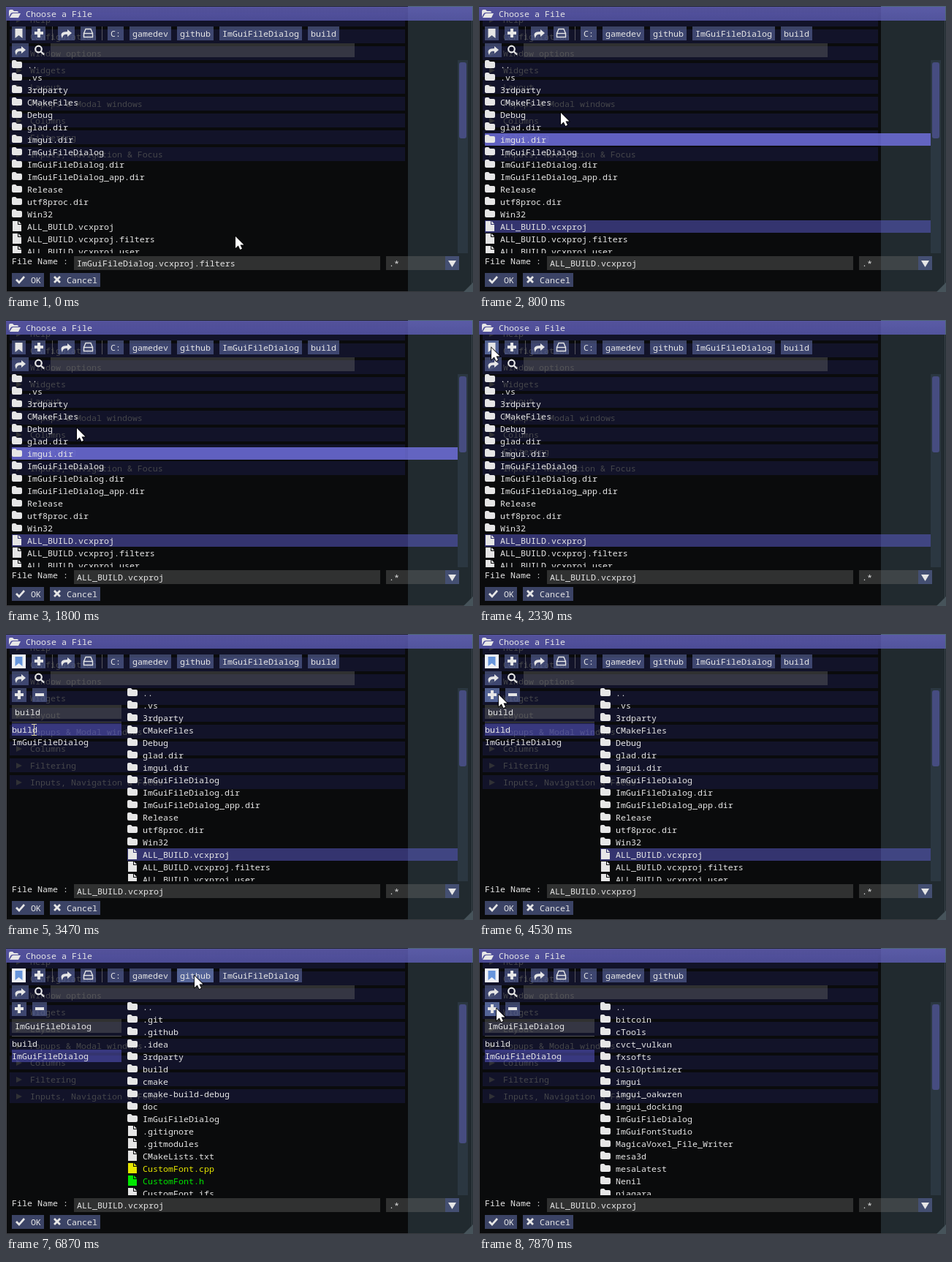
Animation, 639 px wide and 391 px high, one loop 8000 ms. Source, as an HTML page with a canvas:

```html
<!DOCTYPE html>
<html lang="en">
<head>
<meta charset="utf-8">
<title>File dialog</title>
<style>
  html, body { margin: 0; width: 100%; height: 100%; overflow: hidden; background: #0a0b0c; }
  canvas { display: block; }
</style>
</head>
<body>
<canvas id="stage" width="639" height="391"></canvas>
<script>
const ctx = document.getElementById('stage').getContext('2d');
const LOOP = 8000, STEP = 1000 / 15, ROW = 17;
const FONT = '11.667px "Noto Sans Mono", "Liberation Mono", monospace';
const C = {
  text: '#e6e6e6',
  button: 'rgba(89,102,156,.62)', buttonHover: 'rgba(102,122,181,.79)', buttonOn: '#eef0f6',
  field: 'rgba(110,110,110,.39)', line: 'rgba(128,128,128,.6)',
  row: 'rgba(102,102,230,.45)', rowHover: 'rgba(115,115,230,.8)',
  track: 'rgba(51,64,77,.6)', grab: 'rgba(102,102,204,.45)'
};

const icons = {
  folder: 'M0 2Q0 0 2 0H5L7 2H12Q14 2 14 4V9Q14 11 12 11H2Q0 11 0 9Z',
  file: 'M0 0H7V5H12V14H0ZM8 0L12 4H8Z',
  bookmark: 'M0 0H10V13L5 9L0 13Z',
  plus: 'M4 0H8V4H12V8H8V12H4V8H0V4H4Z',
  minus: 'M0 0H12V4H0Z',
  share: 'M9 0L15 5L9 10V7Q3 6 2 12Q-3 3 9 3Z',
  check: 'M0 6L2 4L5 7L11 0L13 2L5 11Z',
  cross: 'M2 0L5 3L8 0L10 2L7 5L10 8L8 10L5 7L2 10L0 8L3 5L0 2Z',
  open: 'M0 10V2Q0 0 2 0H5L7 2H11Q13 2 13 4H5Q3 4 2 6ZM1 11L4 6Q5 5 6 5H16L13 11Z',
  arrow: 'M0 0V16L3.8 12.6L6.4 18L9 16.8L6.5 11.4H11.5Z'
};
for (const name in icons) icons[name] = new Path2D(icons[name]);

const headers = ['Help', 'Configuration', 'Window options', 'Widgets', 'Layout',
  'Popups & Modal windows', 'Columns', 'Filtering', 'Inputs, Navigation & Focus'];

const folders = {
  build: {
    dirs: 13, grab: 104,
    names: ['..', '.vs', '3rdparty', 'CMakeFiles', 'Debug', 'glad.dir', 'imgui.dir', 'ImGuiFileDialog',
      'ImGuiFileDialog.dir', 'ImGuiFileDialog_app.dir', 'Release', 'utf8proc.dir', 'Win32',
      'ALL_BUILD.vcxproj', 'ALL_BUILD.vcxproj.filters', 'ALL_BUILD.vcxproj.user',
      'cmake_install.cmake', 'CMakeCache.txt', 'ImGuiFileDialog.sln', 'ImGuiFileDialog.vcxproj']
  },
  project: {
    dirs: 10, grab: 190,
    names: ['..', '.git', '.github', '.idea', '3rdparty', 'build', 'cmake', 'cmake-build-debug', 'doc',
      'ImGuiFileDialog', '.gitignore', '.gitmodules', 'CMakeLists.txt', 'CustomFont.cpp',
      'CustomFont.h', 'CustomFont.ifs']
  },
  github: {
    dirs: 16, grab: 117,
    names: ['..', 'bitcoin', 'cTools', 'cvct_vulkan', 'fxsofts', 'GlslOptimizer', 'imgui', 'imgui_oakwren',
      'imgui_docking', 'ImGuiFileDialog', 'ImGuiFontStudio', 'MagicaVoxel_File_Writer', 'mesa3d',
      'mesaLatest', 'Nenil', 'niagara']
  }
};
const crumbs = ['C:', 'gamedev', 'github', 'ImGuiFileDialog', 'build'];
const bookmarks = ['build', 'ImGuiFileDialog'];
const bookmarkPaths = ['C:\\gamedev\\github\\ImGuiFileDialog\\build', 'C:\\gamedev\\github\\ImGuiFileDialog'];

// Tracks: [time, values...]
const pointer = [[0, 314, 315], [60, 314, 315], [130, 357, 306], [300, 357, 306], [530, 170, 303],
  [600, 160, 297], [800, 112, 146], [1130, 104, 130], [1260, 104, 130], [1530, 97, 148], [1860, 97, 148],
  [2330, 17, 38], [3300, 17, 38], [3400, 38, 108], [3460, 38, 124], [3530, 37, 141], [4060, 37, 141],
  [4400, 27, 83], [4600, 27, 83], [4870, 41, 128], [5000, 46, 144], [5320, 46, 144], [5460, 45, 154],
  [6140, 45, 154], [6670, 258, 38], [6920, 258, 38], [7530, 15, 80], [7790, 15, 80], [7870, 24, 83]];
const scrolling = [[0, 0], [1260, 0], [1400, 51], [1530, 0], [1930, 0], [2060, 51], [2200, 0]];
const bookmarkHover = [[0, -1], [3520, 0], [3590, 1], [4120, -1], [4920, 0], [5390, 1], [6190, -1]];

function tween(track, t) {
  const i = track.findIndex(k => k[0] > t);
  if (i < 0) return track[track.length - 1].slice(1);
  const a = track[i - 1], b = track[i], p = (t - a[0]) / (b[0] - a[0]);
  return a.slice(1).map((v, n) => Math.round(v + (b[n + 1] - v) * p));
}
const held = (track, t) => track.filter(k => k[0] <= t).pop()[1];

function box(x, y, w, h, color) {
  ctx.fillStyle = color;
  ctx.fillRect(x, y, w, h);
}
function label(s, x, y, color = C.text) {
  ctx.fillStyle = color;
  ctx.fillText(s, x, y + 4);
}
function icon(name, x, y, color = C.text) {
  ctx.save();
  ctx.translate(x, y);
  ctx.fillStyle = color;
  ctx.fill(icons[name]);
  ctx.restore();
}
function triangle(x1, y1, x2, y2, x3, y3, color) {
  ctx.fillStyle = color;
  ctx.beginPath();
  ctx.moveTo(x1, y1); ctx.lineTo(x2, y2); ctx.lineTo(x3, y3);
  ctx.fill();
}
function button(x, y, w, mouse, on) {
  const over = mouse[0] >= x && mouse[0] < x + w && mouse[1] >= y && mouse[1] < y + 20;
  box(x, y, w, 19, on ? C.buttonOn : over ? C.buttonHover : C.button);
}
function row(x, y, w, hovered, selected) {
  if (hovered || selected) box(x, y - 9, w, ROW, hovered ? C.rowHover : C.row);
}

function drawWindow() {
  box(0, 0, 639, 391, '#0a0b0c');
  box(550, 0, 89, 391, '#212a2f');
  headers.forEach((s, i) => {
    const y = 19 + 23 * i;
    box(5, y - 10, 541, 19, '#121329');
    triangle(14, y - 4, 22, y, 14, y + 4, '#303135');
    label(s, 33, y, '#45464a');
  });
  box(0, 0, 550, 2, '#22262b');
  box(550, 0, 89, 20, '#4d6674');
  const title = ctx.createLinearGradient(0, 1, 0, 20);
  title.addColorStop(0, 'rgba(92,90,172,.9)');
  title.addColorStop(1, 'rgba(82,82,161,.9)');
  box(0, 1, 638, 19, title);
  icon('open', 4, 5);
  label('Choose a File', 27, 11);
  box(0, 20, 1, 371, '#45464c');
  box(0, 390, 630, 1, '#3a3b40');
  box(637, 20, 1, 362, '#39434a');
  triangle(639, 378, 639, 391, 626, 391, '#46535a');
}

function drawToolbar(mouse, depth, paneOpen) {
  button(8, 28, 19, mouse, paneOpen);
  icon('bookmark', 12.5, 31, paneOpen ? '#6795dc' : C.text);
  button(35, 28, 19, mouse);
  icon('plus', 39, 31);
  button(71, 28, 23, mouse);
  icon('share', 75, 32);
  button(102, 28, 21, mouse);
  ctx.strokeStyle = C.text;
  ctx.lineWidth = 1.4;
  ctx.strokeRect(106.5, 37.5, 12, 5);
  ctx.beginPath();
  ctx.moveTo(106.5, 37.5); ctx.lineTo(109, 31.5); ctx.lineTo(116, 31.5); ctx.lineTo(118.5, 37.5);
  ctx.stroke();
  for (const x of [63, 131]) box(x, 28, 1, 19, C.line);

  let x = 139;
  for (const s of crumbs.slice(0, depth)) {
    const w = s.length * 7 + 8;
    button(x, 28, w, mouse);
    label(s, x + 4, 38);
    x += w + 8;
  }

  button(8, 51, 23, mouse);
  icon('share', 12, 55);
  ctx.strokeStyle = C.text;
  ctx.lineWidth = 2.2;
  ctx.beginPath();
  ctx.arc(44.5, 59, 4.3, 0, 7);
  ctx.moveTo(47.7, 62.2); ctx.lineTo(52, 66.5);
  ctx.stroke();
  box(61, 51, 416, 19, C.field);
}

function drawBookmarks(mouse, selected, hover) {
  button(8, 74, 20, mouse);
  icon('plus', 12, 77);
  let top = 97;
  if (selected >= 0) {
    button(36, 74, 20, mouse);
    icon('minus', 40, 81);
    box(8, 97, 150, 19, C.field);
    label(bookmarks[selected], 12, 107);
    top = 120;
  }
  box(8, top, 150, 1, C.line);
  bookmarks.forEach((s, i) => {
    const y = top + 11 + ROW * i;
    row(8, y, 150, i === hover, i === selected);
    label(s, 8, y);
  });
}

function drawFiles(folder, left, scroll, selected, hover) {
  ctx.save();
  ctx.beginPath();
  ctx.rect(left, 74, 625, 264);
  ctx.clip();
  folder.names.forEach((s, i) => {
    const y = 81 + ROW * i - scroll;
    row(left, y, 618 - left, i === hover, i === selected);
    const color = s.endsWith('.cpp') ? '#e6e600' : s.endsWith('.h') ? '#00e600' : C.text;
    if (i < folder.dirs) icon('folder', left, y - 7, color);
    else icon('file', left + 1, y - 8, color);
    label(s, left + 21, y, color);
  });
  ctx.restore();
  box(618, 74, 14, 264, C.track);
  ctx.fillStyle = C.grab;
  ctx.beginPath();
  ctx.roundRect(620, 77 + scroll * 0.4, 10, folder.grab, 3);
  ctx.fill();
}

function drawFooter(name, mouse) {
  label('File Name :', 8, 349);
  box(93, 342, 419, 19, C.field);
  label(name, 97, 352);
  box(520, 342, 81, 19, C.field);
  label('.*', 524, 352);
  box(601, 342, 19, 19, C.button);
  triangle(605, 348, 616, 348, 610.5, 357, C.text);
  button(8, 365, 44, mouse);
  icon('check', 13, 369);
  label('OK', 34, 375);
  button(60, 365, 69, mouse);
  icon('cross', 65, 369);
  label('Cancel', 83, 375);
}

function drawTooltip(s, x, y) {
  ctx.beginPath();
  ctx.roundRect(x + 0.5, y + 0.5, s.length * 7 + 15, 27, 7);
  ctx.fillStyle = '#131416';
  ctx.fill();
  ctx.strokeStyle = '#54555c';
  ctx.lineWidth = 1;
  ctx.stroke();
  label(s, x + 8, y + 14);
}

function drawPointer(x, y, beam) {
  if (beam) {
    ctx.strokeStyle = '#d8d0a0';
    ctx.lineWidth = 1;
    ctx.beginPath();
    for (const dy of [-7.5, 7.5]) { ctx.moveTo(x - 3, y + dy); ctx.lineTo(x + 4, y + dy); }
    ctx.moveTo(x + 0.5, y - 7); ctx.lineTo(x + 0.5, y + 7);
    ctx.stroke();
    return;
  }
  ctx.save();
  ctx.translate(x, y);
  ctx.strokeStyle = '#000';
  ctx.lineWidth = 1.5;
  ctx.stroke(icons.arrow);
  ctx.restore();
  icon('arrow', x, y, '#fff');
}

function listHover(t, x, y, left, scroll) {
  if (t < 330 || (t > 2330 && t < 6130)) return -1;
  if (t > 700 && t < 1900) return 6;
  return x >= left && x < 618 && y >= 74 && y < 338 ? Math.floor((y - 72 + scroll) / ROW) : -1;
}

function draw(t) {
  const [x, y] = tween(pointer, t), [scroll] = tween(scrolling, t);
  const paneOpen = t >= 3060, left = paneOpen ? 166 : 8;
  const place = t < 5460 ? 'build' : t < 6930 ? 'project' : 'github';
  const depth = { build: 5, project: 4, github: 3 }[place];
  const picked = t >= 530;
  const bookmark = t < 3400 ? -1 : t < 5460 ? 0 : 1;
  const overBookmark = held(bookmarkHover, t);
  const beam = t >= 3400 && t < 3520;

  ctx.font = FONT;
  drawWindow();
  drawToolbar([x, y], depth, paneOpen);
  drawFiles(folders[place], left, scroll, picked && place === 'build' ? 13 : -1,
    listHover(t, x, y, left, scroll));
  if (paneOpen) drawBookmarks([x, y], bookmark, overBookmark);
  drawFooter(picked ? 'ALL_BUILD.vcxproj' : 'ImGuiFileDialog.vcxproj.filters', [x, y]);
  if (overBookmark >= 0) drawTooltip(bookmarkPaths[overBookmark], x + 23, y + 2);
  drawPointer(x, beam ? y + 5 : y, beam);
}

const start = performance.now();
function tick() {
  const t = (performance.now() - start) % LOOP;
  draw(Math.floor((t + 4) / STEP) * STEP % LOOP);
  requestAnimationFrame(tick);
}
tick();
</script>
</body>
</html>
```
